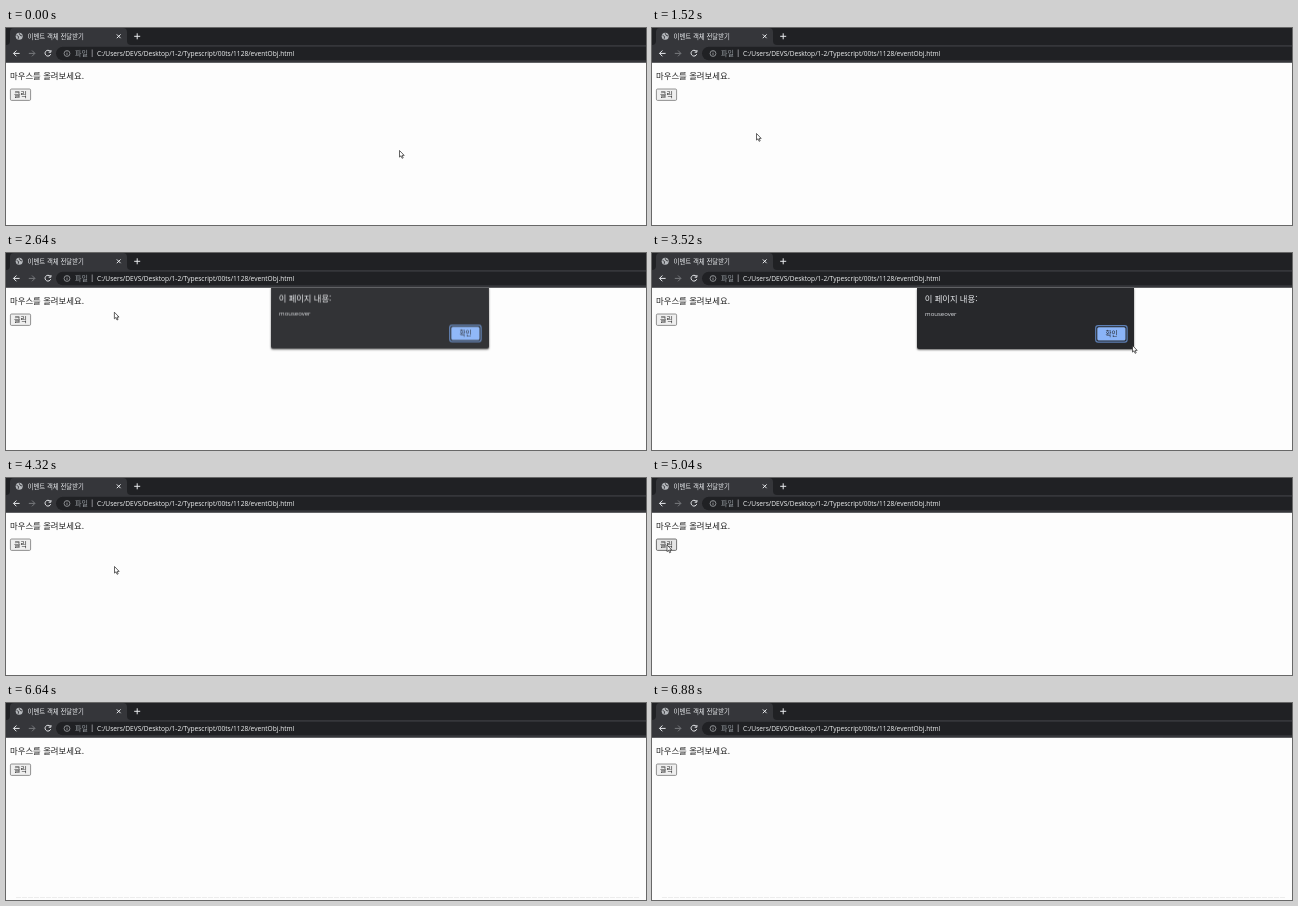
These frames come from a looping animation (640x197 px, 6.96 s). An HTML page:

```html
<!DOCTYPE html>
<html lang="ko">
<head>
<meta charset="utf-8">
<title>이벤트 객체 전달받기</title>
<style>
  html, body { margin: 0; width: 100%; height: 100%; overflow: hidden; background: #fdfdfd; }
  #stage { position: relative; width: 640px; height: 197px; overflow: hidden; }
  svg { position: absolute; left: 0; top: 0; display: block; overflow: visible; }
  text { font-family: "Open Sans", "Noto Sans CJK KR", "Noto Sans CJK", sans-serif; }
  .ko { font-family: "Noto Sans CJK KR", "Noto Sans CJK", sans-serif; }
  .line { fill: none; stroke: #e8eaed; stroke-width: 1; }
  #page-area { position: absolute; left: 0; top: 34.5px; width: 640px; height: 162.5px; overflow: hidden; }
  #dialog {
    position: absolute; left: 264.5px; top: 0; width: 217.5px; height: 61px;
    background: #27282b; border-radius: 0 0 2px 2px; box-shadow: 0 1px 2px rgba(0, 0, 0, .6);
  }
</style>
</head>
<body>
<div id="stage">
  <svg width="640" height="197" viewBox="0 0 640 197">
    <rect width="640" height="197" fill="#fdfdfd"/>

    <!-- tab strip -->
    <rect width="640" height="34.5" fill="#202124"/>
    <path d="M0 17Q4 17 4 13V4Q4 0 8 0H117Q121 0 121 4V13Q121 17 125 17Z" fill="#35363a"/>
    <circle cx="13.2" cy="8.2" r="3.5" fill="#b4b7bb"/>
    <path d="M10.5 7.2L12.6 8.6L12.2 10.8M13.2 5.2L14 7.2L16 8" fill="none" stroke="#35363a" stroke-width=".9"/>
    <text class="ko" x="21.5" y="10.6" font-size="6.4" fill="#e8eaed">이벤트 객체 전달받기</text>
    <path class="line" d="M110.8 6.4l3.8 3.8m0-3.8l-3.8 3.8M128.2 8.3h6m-3-3v6"/>

    <!-- toolbar -->
    <rect y="17" width="640" height="17.5" fill="#35363a"/>
    <rect x="50" y="18.8" width="620" height="13.4" rx="6.7" fill="#202124"/>
    <path class="line" d="M13.6 25.4H7.6m2.8-2.9L7.5 25.4l2.9 2.9"/>
    <path class="line" d="M22.8 25.4h6m-2.8-2.9l2.9 2.9l-2.9 2.9" style="stroke:#77797d"/>
    <path class="line" d="M44.1 23.2A2.9 2.9 0 1 0 44.7 26.2M44.9 22v2.2h-2.2"/>
    <g fill="none" stroke="#a2a5a9" stroke-width=".8">
      <circle cx="61" cy="25.5" r="2.9"/>
      <path d="M61 25v2.1M61 23.6v.8M86.2 21.5v7.5"/>
    </g>
    <text class="ko" x="69" y="28" font-size="7" fill="#9aa0a6">파일</text>
    <text x="91" y="27.8" font-size="6.6" fill="#f1f3f4">C:/Users/DEVS/Desktop/1-2/Typescript/00ts/1128/eventObj.html</text>

    <!-- page -->
    <text class="ko" x="4" y="50.9" font-size="8.4" fill="#222">마우스를 올려보세요.</text>
    <rect id="button" x="4.4" y="61" width="20.2" height="11.4" rx="1.2" stroke-width=".8"/>
    <text class="ko" x="14.5" y="69.3" font-size="7" text-anchor="middle" fill="#222">클릭</text>
    <path id="rule" d="M10 194.5H634" stroke="#e9e9e9" stroke-width=".8" stroke-dasharray="5 1"/>
  </svg>

  <div id="page-area">
    <div id="dialog">
      <svg width="217.5" height="61" viewBox="264.5 34.5 217.5 61">
        <text class="ko" x="272.2" y="48.6" font-size="8.3" fill="#e8eaed">이 페이지 내용:</text>
        <text id="message" x="272.6" y="62.3" font-size="6" fill="#dfe1e5"></text>
        <rect x="443.2" y="72.2" width="31.4" height="16.4" rx="2.4" fill="none" stroke="#5c7fb5" stroke-width="1.2"/>
        <rect x="444.8" y="73.8" width="28.2" height="13.2" rx="1.5" fill="#8ab4f8"/>
        <text class="ko" x="459" y="82.8" font-size="6.5" text-anchor="middle" fill="#202124">확인</text>
      </svg>
    </div>
  </div>

  <svg width="640" height="197" viewBox="0 0 640 197">
    <path id="arrow" d="M0 0V6.6L1.5 5.3L2.6 7.8L3.7 7.3L2.6 4.9H4.7Z" fill="#fff" stroke="#222" stroke-width=".7"/>
    <path id="ibeam" d="M-1.4-3.5H1.4M0-3.5V3.5M-1.4 3.5H1.4" fill="none" stroke="#222" stroke-width=".8"/>
  </svg>
</div>

<script>
const LOOP = 6960, STEP = 80;
const byId = id => document.getElementById(id);
const [button, rule, dialog, message, arrow, ibeam] =
  ['button', 'rule', 'dialog', 'message', 'arrow', 'ibeam'].map(byId);

// time, x, y of the pointer tip
const path = [
  [0, 393.5, 122.5], [720, 540, 168], [800, 540, 168], [1440, 186, 121],
  [1520, 104.5, 105.5], [1600, 63, 92], [1760, 63, 92], [2240, 61, 54.5],
  [2560, 61, 54.5], [3200, 440, 92], [3520, 480.5, 92.5], [3760, 458, 78],
  [3920, 458, 78], [4320, 108.5, 88.5], [4560, 27, 83], [4640, 19, 72],
  [4800, 15, 67], [5120, 15, 67], [5760, 372, 88], [6080, 458, 78], [LOOP, 458, 78]
];
const alerts = [
  { text: 'mouseover', open: 2336, close: 3840 },
  { text: 'click', open: 5040, close: 6080 }
];
const OPEN_MS = 320, CLOSE_MS = 240;

const clamp = v => Math.min(1, Math.max(0, v));
const within = (t, from, to) => t >= from && t < to;
const show = (el, on) => { el.style.display = on ? '' : 'none'; };

function pointerAt(t) {
  const i = path.findIndex(p => p[0] > t);
  const [t0, x0, y0] = path[i - 1], [t1, x1, y1] = path[i];
  const k = (t - t0) / (t1 - t0);
  return [x0 + (x1 - x0) * k, y0 + (y1 - y0) * k];
}

function drawDialog(t) {
  const a = alerts.find(a => within(t, a.open, a.close + CLOSE_MS));
  show(dialog, a);
  if (!a) return;
  const p = Math.min(clamp((t - a.open) / OPEN_MS), 1 - clamp((t - a.close) / CLOSE_MS));
  message.textContent = a.text;
  dialog.style.opacity = p;
  dialog.style.transform = p < 1
    ? `translateY(${-9 * (1 - p)}px) perspective(600px) rotateX(${14 * (1 - p)}deg)`
    : 'none';
}

function draw(now) {
  const t = Math.floor(now % LOOP / STEP) * STEP;
  const [x, y] = pointerAt(t);
  const overText = within(t, 2240, 2640);
  const overButton = within(t, 4640, 5120);

  for (const el of [arrow, ibeam]) el.setAttribute('transform', `translate(${x} ${y})`);
  show(arrow, t < 6400 && !overText);
  show(ibeam, overText);
  button.setAttribute('fill', overButton ? '#e5e5e5' : '#efefef');
  button.setAttribute('stroke', overButton ? '#4f4f4f' : '#767676');
  show(rule, t >= 6640);
  drawDialog(t);
}

function frame() {
  draw(performance.now());
  requestAnimationFrame(frame);
}
frame();
</script>
</body>
</html>
```
